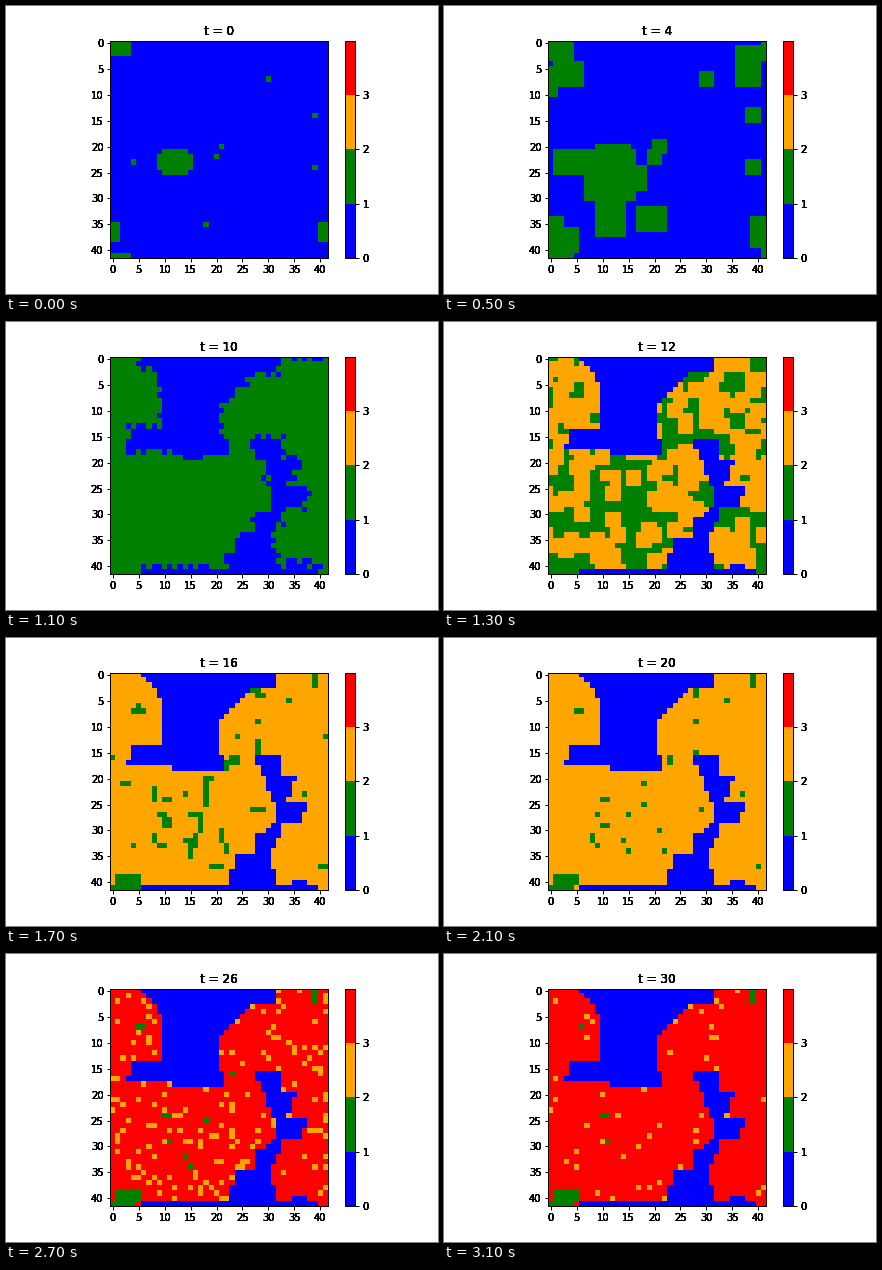
Write a matplotlib script that moves like this. It is 432x288 px and loops after 3300 ms.

```python
from itertools import product

import matplotlib.pyplot as plt
import numpy as np
from matplotlib.animation import FuncAnimation
from matplotlib.colors import ListedColormap

N = 42
LAST = 30
rng = np.random.default_rng(11)
rows, cols = np.mgrid[:N, :N]


def boxes(*parts):
    """Mark boxes given as (row, column, height, width); the grid wraps."""
    mask = np.zeros((N, N), bool)
    for r, c, h, w in parts:
        mask |= ((rows - r) % N < h) & ((cols - c) % N < w)
    return mask


def channel(*shore):
    """Fill between two shores through (row, left, right) key points."""
    r, left, right = zip(*shore)
    inside = (rows >= r[0]) & (rows <= r[-1])
    west = np.round(np.interp(rows, r, left))
    east = np.round(np.interp(rows, r, right))
    return inside & (cols >= west) & (cols <= east)


def dilate(mask):
    """Add the eight neighbours of each cell."""
    shifts = product((-1, 0, 1), repeat=2)
    return np.any([np.roll(mask, s, (0, 1)) for s in shifts], axis=0)


def distance(mask):
    steps = np.zeros((N, N), int)
    while not mask.all():
        steps += ~mask
        mask = dilate(mask)
    return steps


def grow(times, old, new, start, end):
    """Spread from the old area to fill the new one between two times."""
    near, edge = distance(old), distance(~new)
    share = near / np.maximum(near + edge - 1, 1)
    jitter = np.kron(rng.integers(-1, 2, (N // 3, N // 3)), np.ones((3, 3)))
    t = start + np.ceil((end - start) * share) + jitter
    fresh = new & ~old
    times[fresh] = np.clip(t, start + 1, end)[fresh]


def spread_times():
    seeds = boxes((41, 0, 4, 4), (35, 40, 4, 4))
    seeds |= np.hypot((rows - 23) / 2.6, (cols - 12) / 3.5) < 1
    for r, c in ((7, 30), (14, 39), (24, 39), (23, 4), (20, 21),
                 (22, 20), (35, 18)):
        seeds[r, c] = True

    early = dilate(seeds) | boxes(
        (4, 1, 5, 6), (5, 0, 6, 2), (1, 36, 8, 5), (21, 1, 5, 6),
        (21, 7, 10, 10), (24, 16, 5, 3), (31, 9, 7, 6), (32, 17, 5, 6),
        (36, 0, 5, 6))

    lake = channel((0, 6, 31), (2, 8, 31), (3, 9, 26), (6, 10, 23),
                   (9, 10, 20), (13, 10, 20), (14, 4, 20), (16, 4, 21),
                   (17, 3, 21), (18, 12, 21))
    river = channel((16, 28, 32), (19, 29, 32), (20, 30, 35), (24, 31, 33),
                    (25, 32, 37), (28, 32, 36), (29, 31, 32), (31, 28, 32),
                    (34, 28, 30), (35, 24, 30), (40, 23, 31))
    water = lake | river | boxes((41, 6, 1, 34), (40, 35, 1, 3))
    shore = dilate(water) & (rng.random((N, N)) < 0.4)

    final = ~water | early
    mid = (final & ~shore) | early
    times = np.full((N, N), 99)
    times[seeds] = 0
    grow(times, seeds, early, 0, 4)
    grow(times, early, mid, 4, 10)
    grow(times, mid, final, 10, 12)
    return times


def orange_times():
    """Bursts turn whole neighbourhoods; what they miss follows slowly."""
    times = 16 + rng.geometric(0.2, (N, N))
    for t in range(16, 10, -1):
        times[dilate(rng.random((N, N)) < 0.055)] = t
    times[boxes((39, 1, 2, 5), (41, 0, 1, 5), (0, 39, 3, 1),
                (24, 10, 1, 2))] = 99
    return times


green = spread_times()
orange = np.maximum(orange_times(), green)
red = np.maximum(20 + rng.geometric(0.3, (N, N)), orange + 1)


def state(t):
    return sum((t >= times).astype(int) for times in (green, orange, red))


def heavy(label):
    """Draw a label several times so that its soft edges turn dark."""
    draw = label.draw

    def repeat(renderer):
        for _ in range(8):
            draw(renderer)

    label.draw = repeat


plt.rcParams.update({"axes.linewidth": 1, "xtick.major.width": 1,
                     "ytick.major.width": 1})
fig, ax = plt.subplots(figsize=(6, 4), dpi=72, facecolor="white")
fig.subplots_adjust(left=0.125, right=0.9, bottom=0.125, top=0.88)
colors = ListedColormap(["blue", "green", "orange", "red"])
image = ax.imshow(state(0), cmap=colors, vmin=0, vmax=4,
                  interpolation="nearest")
bar = fig.colorbar(image, ax=ax, ticks=[0, 1, 2, 3])
ax.set_xticks(range(0, N, 5))
ax.set_yticks(range(0, N, 5))
title = ax.set_title("t = 0")

for label in (ax.get_xticklabels() + ax.get_yticklabels()
              + bar.ax.get_yticklabels() + [title]):
    heavy(label)


def update(frame):
    t = min(max(frame - 1, 0), LAST)
    image.set_data(state(t))
    title.set_text(f"t = {t}")
    return image, title


anim = FuncAnimation(fig, update, frames=33, interval=100, repeat=True,
                     repeat_delay=0, blit=False)
plt.show()
```
